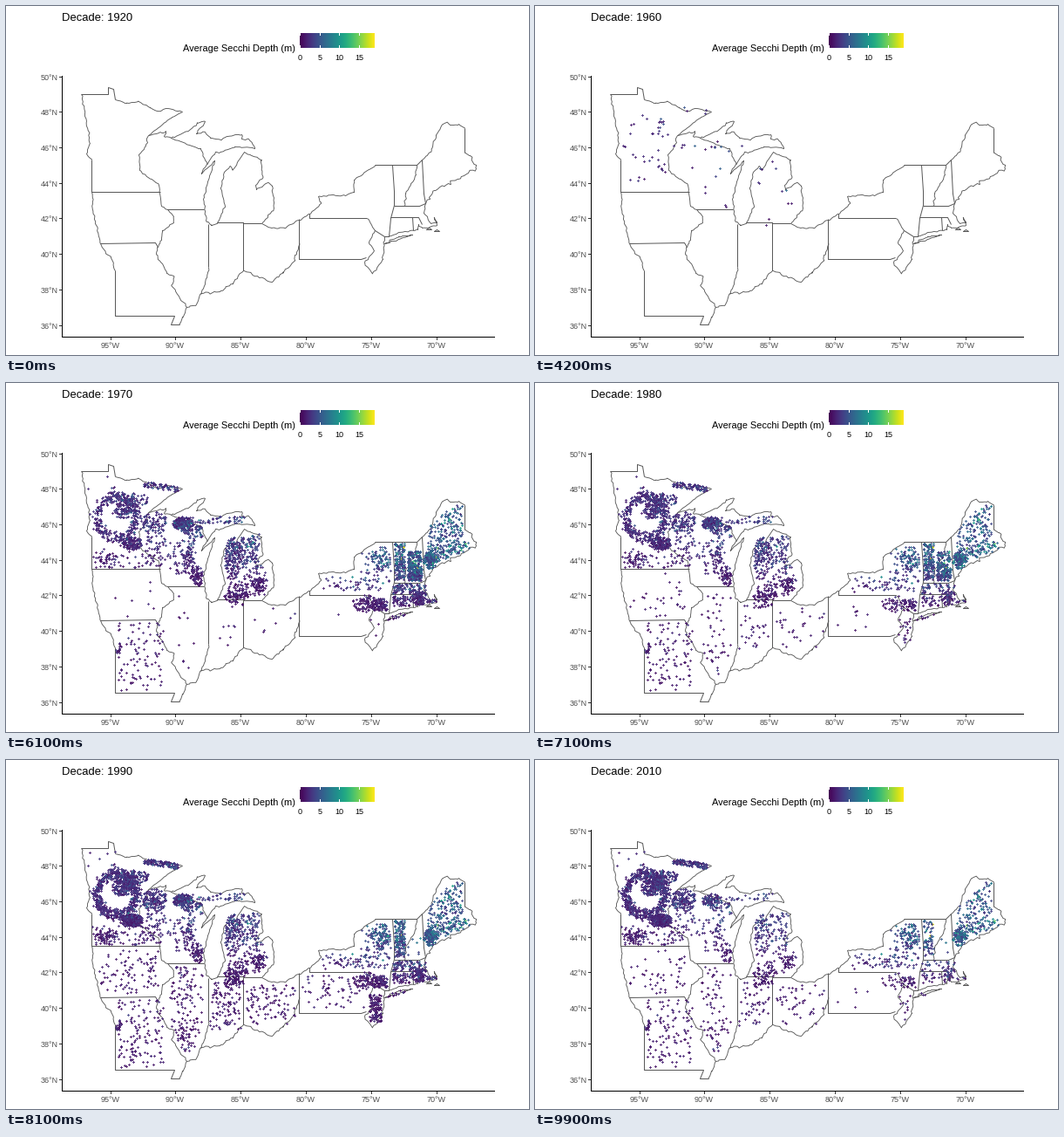
A matplotlib script that plays this animation: 600 by 400 pixels, repeating every 10000 ms.

```python
import numpy as np
import matplotlib.pyplot as plt
from matplotlib.animation import FuncAnimation

W, H, DPI = 600, 400, 100
PX = 72 / DPI
FRAMES, INTERVAL = 100, 100
MAX_DEPTH = 18.9
GREY = "#595959"
plt.rcParams["font.family"] = "Liberation Sans"

fig = plt.figure(figsize=(W / DPI, H / DPI), dpi=DPI, facecolor="white")
ax = fig.add_axes([0, 0, 1, 1])
ax.axis("off")
rng = np.random.default_rng(12)


def text(x, y, s, size, color="black", ha="left"):
    return ax.text(x, y, s, fontsize=size * PX, color=color, ha=ha, va="baseline")


def stroke(x, y, color, width=1.0):
    ax.plot(x, y, color=color, lw=width * PX, snap=False, solid_capstyle="butt")


def border(*xy):
    """Straight state line through flat x, y pairs."""
    stroke(np.array(xy[::2]) + 0.5, np.array(xy[1::2]) + 0.5, GREY)


def shore(*xy, rough=0.5):
    """River or coast through a few key points, with a seeded wobble."""
    pts = np.array(xy, float).reshape(-1, 2)
    knots = np.r_[0, np.cumsum(np.hypot(*np.diff(pts, axis=0).T))]
    s = np.union1d(knots, np.arange(0, knots[-1], 2.8))
    free = ~np.isin(s, knots)
    line = np.array([np.interp(s, knots, c) for c in pts.T])
    line += rng.normal(0, rough, line.shape) * free
    stroke(line[0] + 0.5, line[1] + 0.5, GREY, 0.9)


def draw_west():
    border(86, 101, 117, 101, 117, 93, 123, 95, 125, 107)
    shore(125, 107, 138, 111, 151, 109, 165, 116, 174, 120, 183, 117, 202, 121)
    shore(202, 121, 190, 127, 163, 148, rough=0.3)
    shore(86, 101, 95, 150, 96, 157, 92, 169, 98, 176)
    border(98, 176, 98, 213, 177, 213)
    shore(163, 148, 160, 160, 152, 170, 153, 188, 175, 205, 178, 229, 185, 233, 192, 241,
          192, 248, 179, 257, 178, 268, 174, 276, 172, 284, 184, 306, 192, 309, 190, 321,
          207, 345, 202, 356, 199, 365)
    shore(98, 213, 99, 233, 108, 272, 115, 284, 120, 287, 125, 303)
    border(108, 272, 171, 271, 174, 276)
    border(125, 303, 125, 355, 193, 355, 189, 365, 199, 365)
    border(185, 233, 227, 233)


def draw_lakes_shore():
    shore(163, 148, 183, 143, 181, 149, 189, 151, 210, 142, 219, 134, 228, 132, 218, 146,
          228, 144, 234, 151, 246, 153, 253, 149, 270, 147, 270, 152, 278, 152, 285, 162,
          262, 161, 244, 168, 240, 167, 230, 181, 224, 192, 239, 177, 231, 201, 226, 221,
          230, 247, 236, 251, 242, 248)
    shore(189, 151, 223, 164, 230, 181)
    shore(242, 248, 251, 230, 246, 209, 251, 189, 257, 183, 260, 187, 273, 167, 292, 176,
          294, 197, 286, 205, 287, 210, 300, 202, 305, 206, 307, 231, 293, 249)
    border(242, 248, 272, 248, 272, 249, 293, 249)
    border(232, 250, 232, 299)
    border(272, 248, 272, 303)
    shore(232, 299, 230, 311, 224, 329)
    shore(207, 345, 217, 343, 224, 329, 245, 327, 260, 317, 272, 303, 290, 311, 305, 316,
          317, 305, 331, 291, 336, 271, rough=0.7)


def draw_east():
    shore(293, 249, 304, 254, 319, 254, 348, 238, 361, 226, 358, 218, 374, 216, 389, 217,
          399, 213, 399, 199, 423, 182)
    border(336, 244, 336, 290, 407, 290, 413, 288)
    border(348, 238, 348, 243, 414, 243)
    shore(414, 243, 423, 257, 416, 271, 422, 280, 411, 294, 420, 306, 432, 290, 434, 264)
    border(423, 257, 434, 264, 439, 264, 441, 243, 445, 228, 445, 212, 443, 182)
    shore(434, 272, 466, 262, 450, 264, 434, 272, rough=0.7)
    border(423, 182, 471, 182, 477, 176, 479, 215, 481, 226, 474, 229, 445, 229)
    shore(457, 229, 458, 215, 470, 193, 471, 182)
    shore(477, 176, 487, 167, 493, 148, 499, 137, 505, 133, 510, 136, 519, 135, 526, 140)
    border(526, 140, 526, 168)
    shore(526, 168, 532, 171, 539, 186, 507, 203, 491, 211, 481, 226, rough=0.9)
    shore(481, 226, 479, 237, 487, 249, 494, 248, 491, 242, 494, 251, 477, 254, 473, 250,
          472, 256, 450, 259, 439, 264)
    border(441, 242, 473, 242, 477, 250)
    border(466, 242, 467, 257)
    for x, y in ((485, 256), (494, 258)):
        border(x - 3, y, x, y - 2, x + 3, y, x - 3, y)


def draw_axes():
    stroke([64.5, 64.5], [80, 380], "black")
    stroke([64, 561], [379.5, 379.5], "black")
    for i in range(6):
        x = round(119.7 + 74.8 * i)
        stroke([x + 0.5] * 2, [380, 383], "#333333")
        text(x, 392.5, f"{95 - 5 * i}°W", 9, "#4d4d4d", "center")
    for i in range(8):
        y = round(80.6 + 40.7 * i)
        stroke([61, 64], [y + 0.5] * 2, "#333333")
        text(59.5, y + 3.6, f"{50 - 2 * i}°N", 9, "#4d4d4d", "right")


def draw_legend():
    text(203, 52, "Average Secchi Depth (m)", 11)
    ax.imshow(np.linspace(0, 1, 256)[None], cmap="viridis", aspect="auto",
              extent=(337, 423, 48, 31), interpolation="bilinear")
    for v in (0, 5, 10, 15):
        x = 337.5 + round(4.53 * v)
        for y in (31, 45):
            stroke([x, x], [y, y + 3], "white")
        text(x, 61.7, str(v), 9, ha="center")


def place(p, x, y, w, h, slope):
    dx = p[0] * w
    return np.floor([x + dx, y + p[1] * h + slope * dx])


def box(n, x, y, w, h, slope=0.0):
    """Lakes spread evenly over a sheared box of half-size w, h."""
    return place(rng.uniform(-1, 1, (2, n)), x, y, w, h, slope)


def cluster(n, x, y, w, h, slope=0.0):
    """Lakes crowded towards the middle of an ellipse."""
    a, r = rng.uniform(0, 2 * np.pi, n), rng.uniform(0, 1, n) ** 0.7
    return place(r * [np.cos(a), np.sin(a)], x, y, w, h, slope)


def ring(n, x, y, w, h):
    a, r = rng.uniform(0, 2 * np.pi, n), rng.normal(1, 0.13, n)
    return place(r * [np.cos(a), np.sin(a)], x, y, w, h, 0)


# Share of each area's lakes measured per decade, 1930 to 2010
MINNESOTA = (0, .015, .012, .03, .35, .55, .65, 1, 1)
GREAT_LAKES = (0, 0, .004, .022, .6, 1, .75, .8, .45)
PLAINS = (0, 0, 0, 0, .04, .07, .3, 1, .5)
STEADY = (0, 0, 0, 0, .45, .7, .8, 1, .85)
ATLANTIC = (0, 0, 0, 0, 0, .02, .15, 1, .08)
VERMONT = (0, 0, 0, 0, .4, 1, 1, 1, .4)
HAMPSHIRE = (0, 0, 0, 0, .5, 1, .65, .02, .01)
SOUTH_COAST = (.005, 0, 0, 0, .5, 1, .5, .9, .3)
MAINE = (0, 0, .004, 0, .5, 1, .8, .9, .65)


def lake_pools():
    yield MINNESOTA, [
        ring(620, 127, 154, 23, 24), cluster(260, 144, 184, 13, 8),
        cluster(190, 135, 146, 14, 10), cluster(140, 145, 134, 20, 8),
        box(140, 178, 119, 20, 3, .15), box(80, 135, 201, 36, 11),
        cluster(60, 116, 202, 14, 9), box(9, 110, 115, 20, 11),
        cluster(170, 171, 161, 15, 13)]
    yield GREAT_LAKES, [
        cluster(210, 203, 161, 12, 7), box(80, 213, 168, 13, 7, .3),
        box(60, 238, 157, 36, 4), box(120, 188, 196, 28, 20, .3),
        cluster(70, 210, 195, 8, 26), cluster(80, 219, 221, 7, 13),
        box(200, 272, 192, 19, 16, -.15), cluster(90, 260, 203, 9, 20),
        box(110, 275, 226, 23, 18), cluster(90, 264, 243, 14, 10),
        cluster(70, 291, 231, 10, 8)]
    yield PLAINS, [
        box(100, 252, 282, 18, 27), cluster(70, 262, 254, 12, 8),
        box(95, 304, 280, 28, 23), box(105, 207, 275, 19, 38),
        cluster(45, 208, 318, 12, 16), box(95, 141, 243, 34, 25)]
    yield STEADY, [
        box(130, 155, 314, 26, 39), cluster(20, 130, 305, 4, 8),
        box(70, 400, 231, 38, 9), cluster(110, 430, 202, 12, 16),
        box(50, 424, 210, 18, 20)]
    yield ATLANTIC, [box(130, 424, 285, 7, 16), box(60, 375, 266, 36, 20)]
    yield VERMONT, [box(165, 452, 205, 6, 21)]
    yield HAMPSHIRE, [box(240, 469, 210, 8, 17), cluster(100, 470, 218, 10, 9)]
    yield SOUTH_COAST, [
        box(95, 463, 236, 19, 6), box(60, 455, 250, 11, 6),
        cluster(110, 474, 246, 8, 10), box(18, 489, 250, 6, 1.5),
        box(15, 448, 268, 10, 2, -.3), cluster(95, 413, 253, 16, 10),
        box(90, 430, 254, 8, 7)]
    yield MAINE, [
        box(240, 504, 173, 20, 24, -.6), cluster(150, 487, 203, 8, 10),
        box(80, 510, 194, 22, 5, -.4)]


def lake_depth(x, y):
    """Clearer water towards the north and east."""
    north = np.clip((215 - y + 0.13 * (x - 140)) / 50, 0, 1)
    return (1.4 + north * x / 125) * rng.lognormal(0, 0.38, x.size)


def lake_layers():
    pools = [(share, p, lake_depth(*p)) for share, areas in lake_pools() for p in areas]
    for k in range(len(MAINE)):
        taken = [(p, d, round(share[k] * d.size)) for share, p, d in pools]
        x, y = np.hstack([p[:, :n] for p, d, n in taken])
        depth = np.hstack([d[:n] for p, d, n in taken])
        order = rng.permutation(x.size)
        yield ax.scatter(x[order] + 0.5, y[order] + 0.5, c=depth[order], cmap="viridis",
                         vmin=0, vmax=MAX_DEPTH, marker="+", s=(3 * PX) ** 2,
                         linewidths=PX, alpha=0.85, zorder=3, snap=False, visible=False)


draw_west()
draw_lakes_shore()
draw_east()
draw_axes()
draw_legend()
layers = list(lake_layers())
title = text(64, 17, "Decade: 1920", 13)
ax.set_xlim(0, W)
ax.set_ylim(H, 0)


def update(n):
    # lakes switch one step ahead of the title
    shown = (n - 1) // 10 - 1
    for i, layer in enumerate(layers):
        layer.set_visible(i == shown)
    title.set_text(f"Decade: {1920 + 10 * max(0, (n - 2) // 10)}")
    return [title, *layers]


anim = FuncAnimation(fig, update, frames=FRAMES, interval=INTERVAL, repeat=True,
                     repeat_delay=0, blit=False)
plt.show()
```
